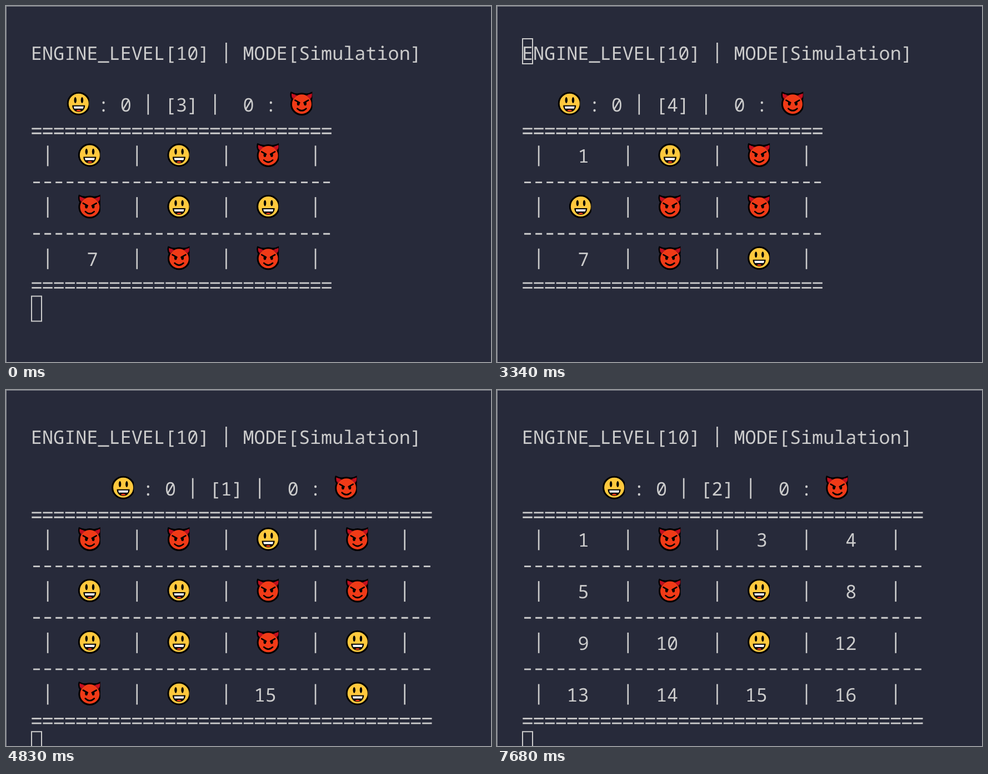
These frames come from a looping animation (873 by 641 pixels, 8000 ms). An HTML page:

```html
<!DOCTYPE html>
<html lang="en">
<head>
<meta charset="utf-8">
<title>Terminal board game</title>
<style>
html, body { margin: 0; width: 100%; height: 100%; overflow: hidden; background: #272a3a; }
svg { display: block; width: 873px; height: 641px; }
text {
  font: 33.47px "Noto Sans Mono", "DejaVu Sans Mono", monospace;
  fill: #ccc; white-space: pre; text-rendering: geometricPrecision;
}
</style>
</head>
<body>
<svg viewBox="0 0 873 641">
  <defs>
    <clipPath id="cut"><rect x="-24" y="-24" width="43" height="48"/></clipPath>
    <g id="smile" clip-path="url(#cut)">
      <circle r="19.5" fill="#ffc83d" stroke="#000" stroke-width="3"/>
      <ellipse cx="-6" cy="-6.2" rx="2.2" ry="5.4"/>
      <ellipse cx="6.2" cy="-6.2" rx="2.2" ry="5.4"/>
      <path d="M-11.5 3H11.5C11.5 10.500 6.500 15 0 15S-11.500 10.500-11.500 3Z"/>
      <path d="M-9 5H9L8 9H-8Z" fill="#fff"/>
      <path d="M-4.500 13C-3 10.500 3 10.500 4.500 13Q0 15-4.500 13Z" fill="#f03a17"/>
    </g>
    <g id="devil" clip-path="url(#cut)">
      <path d="M-19-20Q-13-16.500-6-17L-17-7Q-21-13-19-20ZM19-20Q13-16.500 6-17L17-7Q21-13 19-20Z"
        fill="#c50f1f" stroke="#000" stroke-width="2.6" stroke-linejoin="round"/>
      <circle cy="1" r="19" fill="#f03a17" stroke="#000" stroke-width="3"/>
      <path d="M-17-17Q-12-14.500-8-15L-16-8ZM17-17Q12-14.500 8-15L16-8Z" fill="#c50f1f"/>
      <ellipse cx="-6.2" cy="0" rx="2.4" ry="3.5"/>
      <ellipse cx="6.2" cy="0" rx="2.4" ry="3.5"/>
      <path d="M-12-6L-4-1.500M12-6L4-1.500M-8 9Q0 16.500 8 9"
        fill="none" stroke="#000" stroke-width="2.6" stroke-linecap="round"/>
    </g>
  </defs>
  <rect width="873" height="641" fill="#272a3a"/>
  <g id="screen"></g>
  <path d="M0 .5H873M.5 0V641" stroke="#8b8d94" fill="none"/>
</svg>
<script>
const LOOP = 8000, CW = 20.08, LH = 46.35, X0 = 45, Y0 = 58;
const TITLE = 'ENGINE_LEVEL[10]   MODE[Simulation]';
const EMPTY3 = '.'.repeat(9), EMPTY4 = '.'.repeat(16);
const NEAR4 = 'ddsdssddssdsd..s', LAST4 = 'ddsdssddssdsds.s';

// time, round, board (s smile, d devil, . free), view: home, blank or title
const steps = [
  [0, 3, 'ssddss.dd'],
  [130, 3, 'ssddss.dd', 'home'], [200, 4, EMPTY3],
  [620, 4, EMPTY3, 'blank'], [670, 4, '....d....'],
  [1050, 4, '....d....', 'home'], [1100, 4, '....d...s'],
  [1540, 4, '....d..ds'],
  [1910, 4, '....d..ds', 'blank'], [1970, 4, '.s..d..ds'],
  [2280, 4, '.s..dd.ds'],
  [2650, 4, '.s.sdd.ds'],
  [2970, 4, '.s.sdd.ds', 'home'], [3030, 4, '.sdsdd.ds'],
  [3340, 4, '.sdsdd.ds', 'home'], [3410, 4, '.sdsddsds'],
  [3710, 4, '.sdsddsds', 'blank'], [3770, 5, EMPTY3],
  [4210, 5, EMPTY3, 'blank'], [4260, 5, '....s....'],
  [4470, 1, NEAR4],
  [4780, 1, NEAR4, 'blank'], [4830, 1, LAST4],
  [5150, 1, LAST4, 'home'],
  [5210, 2, EMPTY4.slice(8) + LAST4.slice(8), 'home'],
  [5270, 2, EMPTY4],
  [5890, 2, EMPTY4, 'title'], [5950, 2, '..........s.....'],
  [6510, 2, '.....d....s.....'],
  [7070, 2, '.....d....s.....', 'home'], [7130, 2, '.....ds...s.....'],
  [7680, 2, '.d...ds...s.....']
];

const px = col => X0 + col * CW;
const py = row => Y0 + row * LH;
const text = (col, row, s) => `<text x="${px(col)}" y="${py(row) + 39}">${s}</text>`;
const line = (d, w, dash = '') =>
  `<path d="${d}" stroke="#ccc" stroke-width="${w}" stroke-dasharray="${dash}" fill="none"/>`;
const pipe = (col, row) => line(`M${px(col + .5)} ${py(row) + 8}v37`, 2.6);
const face = (col, row, kind) =>
  `<use href="#${kind === 's' ? 'smile' : 'devil'}" x="${px(col) + 25.5}" y="${py(row) + 25}"/>`;
const cursor = (col, row) =>
  `<rect x="${px(col) + 1}" y="${py(row) + 1}" width="18" height="45" fill="none" stroke="#ccc" stroke-width="2"/>`;

function dashes(row, count, y, width) {
  const pad = (CW - width) / 2;
  return line(`M${px(0) + pad} ${py(row) + y}H${px(count) - pad}`, 2.8, `${width} ${CW - width}`);
}
const doubleRule = (row, count) => dashes(row, count, 23.8, 17.4) + dashes(row, count, 32.2, 17.4);

function score(round, shift) {
  const at = (col, s) => text(col + shift, 2, s);
  return face(3 + shift, 2, 's') + at(6, ':') + at(8, '0') + pipe(10 + shift, 2) +
    at(12, `[${round}]`) + pipe(16 + shift, 2) + at(19, '0') + at(21, ':') + face(23 + shift, 2, 'd');
}

function grid(cells, size) {
  const width = size * 8 + (size === 3 ? 3 : 4);
  let out = doubleRule(3, width);
  for (let r = 0; r < size; r++) {
    const row = 4 + r * 2;
    for (let c = 0; c <= size; c++) out += pipe(1 + c * 8, row);
    for (let c = 0; c < size; c++) {
      const i = r * size + c, col = 4 + c * 8;
      const label = String(i + 1).padStart(2, ' ').trim();
      out += cells[i] === '.'
        ? text(col + 2 - label.length, row, label)
        : face(col, row, cells[i]);
    }
    out += r < size - 1 ? dashes(row + 1, width, 27.8, 12) : doubleRule(row + 1, width);
  }
  return out;
}

function draw([, round, cells, view]) {
  if (view === 'blank') return cursor(0, 0);
  const title = text(0, 0, TITLE) + pipe(17, 0);
  if (view === 'title') return title + cursor(35, 0);
  const size = Math.sqrt(cells.length);
  return title + score(round, (size - 3) * 4) + grid(cells, size) +
    (view === 'home' ? cursor(0, 0) : cursor(0, 4 + size * 2));
}

const screen = document.getElementById('screen');
let shown;
function update(now) {
  const t = now % LOOP;
  const step = steps.findLast(s => s[0] <= t);
  if (step !== shown) {
    shown = step;
    screen.innerHTML = draw(step);
  }
  requestAnimationFrame(update);
}
update(performance.now());
</script>
</body>
</html>
```
